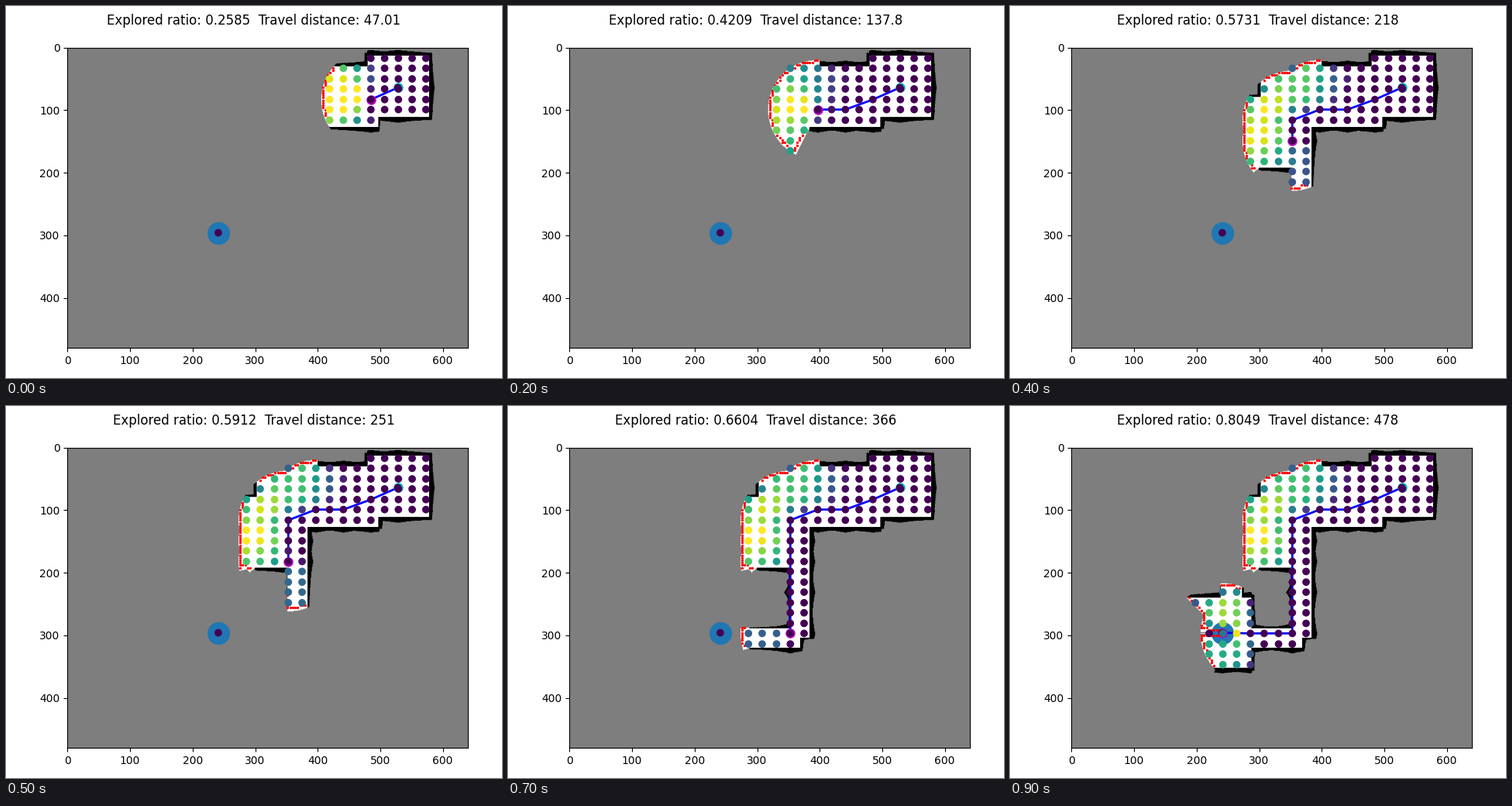
Write a matplotlib script that moves like this. It is 640 px wide and 480 px high and loops after 1000 ms.

```python
import numpy as np
import matplotlib.pyplot as plt
from matplotlib.animation import FuncAnimation

W, H = 640, 480
WALL, UNKNOWN, FREE = 1, 127, 255
SENSOR, UTILITY_RANGE, WALL_DEPTH, CELL = 80, 70, 10, 4

# Free space as (left, top, right, bottom)
ROOMS = [
    (480, 13, 578, 111), (303, 30, 497, 127), (303, 10, 400, 30),
    (230, 79, 384, 192), (230, 192, 300, 206), (352, 192, 384, 304),
    (288, 289, 369, 320), (160, 240, 288, 352), (239, 206, 273, 240),
]
ROUTE = [(528, 64), (485, 83), (441, 99), (397, 99), (353, 116), (353, 149),
         (353, 182), (353, 231), (353, 297), (286, 297), (241, 296)]
RATIOS = [0.2585, 0.3346, 0.4209, 0.5214, 0.5731, 0.5912, 0.618, 0.6604,
          0.7918, 0.8049]
GOAL = ROUTE[-1]


def build_world():
    world = np.full((H, W), WALL)
    for left, top, right, bottom in ROOMS:
        world[top:bottom, left:right] = FREE
    world[[296, 298], 240] = WALL  # small posts beside the goal
    return world.tolist()


def cast_ray(world, belief, start, end):
    """Reveal cells along a ray until it ends or sinks into a wall."""
    (x, y), (x1, y1) = start, end
    dx, dy = abs(x1 - x), abs(y1 - y)
    step_x = 1 if x1 > x else -1
    step_y = 1 if y1 > y else -1
    error = dx - dy
    hits = 0
    while 0 <= x < W and 0 <= y < H and (x, y) != (x1, y1):
        value = world[y][x]
        if value == WALL:
            hits += 1
            if hits >= WALL_DEPTH:
                break
        elif hits:
            break
        belief[y, x] = value
        if error > 0:
            x += step_x
            error -= 2 * dy
        else:
            y += step_y
            error += 2 * dx


def sense(world, belief, pose):
    x, y = pose
    for angle in np.radians(np.arange(0, 360, 0.5)):
        end = (int(round(x + SENSOR * np.cos(angle))),
               int(round(y + SENSOR * np.sin(angle))))
        cast_ray(world, belief, pose, end)


def find_frontiers(belief):
    """Free coarse cells that touch at least two unknown ones."""
    rows, cols = H // CELL, W // CELL
    coarse = belief.reshape(rows, CELL, cols, CELL).min(axis=(1, 3))
    unknown = np.pad((coarse == UNKNOWN).astype(int), 1)
    count = sum(unknown[i:i + rows, j:j + cols]
                for i in range(3) for j in range(3) if (i, j) != (1, 1))
    ys, xs = np.nonzero((coarse == FREE) & (count > 1) & (count < 8))
    return np.column_stack([xs, ys]) * CELL


def utility(belief, node, frontiers):
    """Number of frontier points in range and in plain sight."""
    node = np.array(node)
    near = frontiers[np.hypot(*(frontiers - node).T) < UTILITY_RANGE]
    t = np.linspace(0, 1, 90)[:, None, None]
    cells = np.rint(node + t * (near - node)).astype(int)
    clear = belief[cells[..., 1], cells[..., 0]] == FREE
    return int(clear.all(axis=0).sum())


def explore():
    world = build_world()
    belief = np.full((H, W), UNKNOWN)
    grid = [(int(x), int(y)) for x in np.rint(np.linspace(0, W - 1, 30))
            for y in np.rint(np.linspace(0, H - 1, 30))]
    sense(world, belief, ROUTE[0])
    states = []
    for step in range(1, len(ROUTE)):
        sense(world, belief, ROUTE[step])
        frontiers = find_frontiers(belief)
        nodes = sorted({p for p in grid if belief[p[1], p[0]] == FREE}
                       | {ROUTE[0], GOAL})
        done = set(ROUTE[:step + 1]) | {GOAL}
        scores = [0 if p in done else utility(belief, p, frontiers)
                  for p in nodes]
        states.append((belief.copy(), frontiers, np.array(nodes), scores))
    return states


STATES = explore()
path = np.array(ROUTE)
travel = np.cumsum(np.hypot(*np.diff(path, axis=0).T))

fig = plt.figure(figsize=(6.4, 4.8), dpi=100)
ax = fig.add_axes([79.4 / W, 38.9 / H, 516.5 / W, 387.375 / H])


def draw(frame):
    belief, frontiers, nodes, scores = STATES[frame]
    trail = path[:frame + 2]
    ax.clear()
    ax.imshow(belief, cmap="gray")
    ax.axis((0, W, H, 0))
    ax.plot(*GOAL, "o", color="C0", markersize=20)
    ax.scatter(*nodes.T, c=scores, zorder=5)
    ax.scatter(*frontiers.T, c="r", s=2, zorder=3)
    ax.plot(*trail.T, "b", linewidth=2)
    ax.plot(*trail[-1], "mo", markersize=8)
    ax.plot(*trail[0], "co", markersize=8)
    fig.suptitle(f"Explored ratio: {RATIOS[frame]:.4g}  "
                 f"Travel distance: {travel[frame]:.4g}")
    return ax.get_children()


anim = FuncAnimation(fig, draw, frames=len(STATES), interval=100, repeat=True)
plt.show()
```
